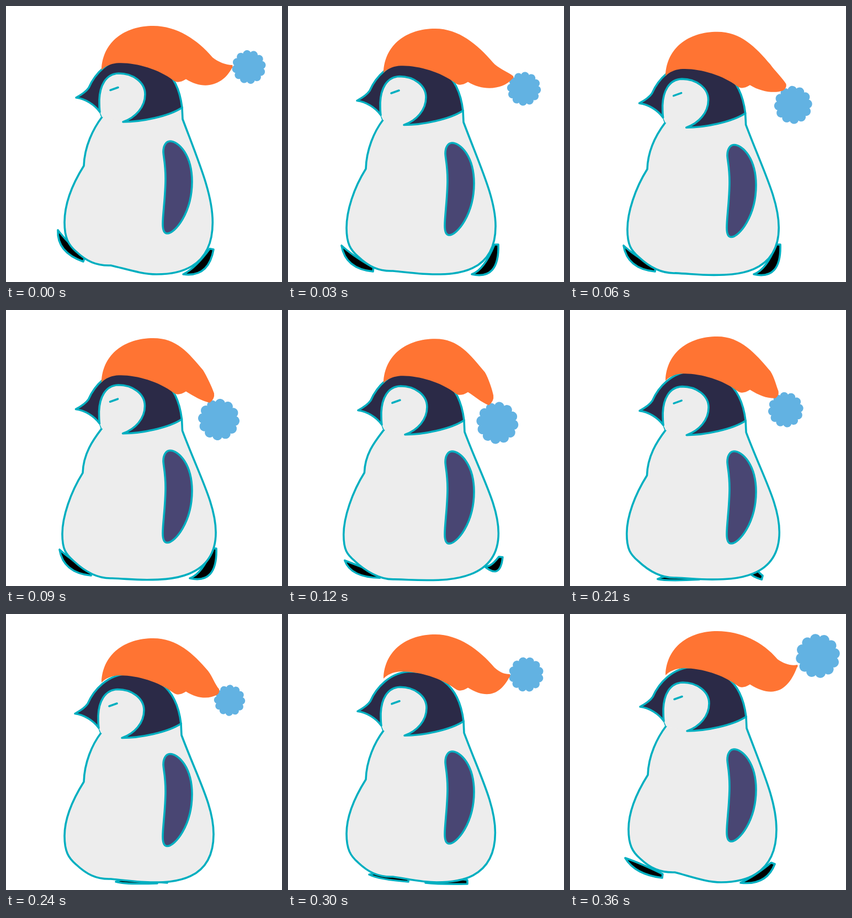
Write an HTML page that moves like this. It is 500 by 500 pixels and loops after 390 ms.

```html
<!DOCTYPE html>
<html lang="en">
<head>
<meta charset="utf-8">
<title>Walking penguin</title>
<style>
  html, body { margin: 0; height: 100%; overflow: hidden; background: #fff; }
  svg { display: block; width: 100vw; height: 100vh; }
  .line { stroke: #00afc0; stroke-width: 3.6; stroke-linejoin: round; stroke-linecap: round; }
  .light { fill: #ededed; }
  .dark { fill: #2b2a47; }
  .wing { fill: #494673; }
  .hat { fill: #ff7433; }
  .pom { fill: #62b2e2; }
  .none { fill: none; }
</style>
</head>
<body>
<svg viewBox="0 0 500 500">
  <path id="footA" class="line"/>
  <path id="footB" class="line"/>
  <path id="body" class="line light"/>
  <g id="head">
    <path id="face" class="light"/>
    <path id="hood" class="line dark"/>
    <path class="line none" d="M189 152.500L203 147.500"/>
  </g>
  <path id="pom" class="pom"/>
  <path id="hat" class="hat"/>
  <path id="wing" class="line wing" d="M297 245C290 245 285 253 285 264C285 272 289 285 289 312C289 345 284 375 284 395C284 406 287 412 292 412C306 412 337 375 337 318C337 270 313 245 297 245Z"/>
</svg>
<script>
const STEP = 30, COUNT = 13, STRIDE = 11;
const $ = id => document.getElementById(id);
const draw = (id, d) => $(id).setAttribute('d', d);
const move = (id, x, y) => $(id).setAttribute('transform', `translate(${x} ${y})`);

// Looping smooth curve through timed poses; each pose is [time, ...values].
function track(period, poses) {
  const n = poses.length;
  const at = i => poses[(i + n) % n];
  const time = i => at(i)[0] + period * Math.floor(i / n);
  return t => {
    let i = n - 1;
    while (time(i) > t) i--;
    const [t0, t1, t2, t3] = [-1, 0, 1, 2].map(k => time(i + k));
    const [a, b, c, d] = [-1, 0, 1, 2].map(k => at(i + k));
    const h = t2 - t1, u = (t - t1) / h, v = 1 - u;
    return b.slice(1).map((p, j) => {
      const q = c[j + 1];
      const m = (q - a[j + 1]) / (t2 - t0) * h;
      const w = (d[j + 1] - p) / (t3 - t1) * h;
      return p * v * v * (1 + 2 * u) + q * u * u * (3 - 2 * u) + m * u * v * v - w * u * u * v;
    });
  };
}

// head x, head y, hat y, wing y, belly drop, belly squash
const torso = track(COUNT, [
  [0, 0, 0, 0, 0, 2, 0],
  [1, -2, 5.5, 5, 3, 12, 0],
  [3, -.5, 13.7, 15, 9.5, 18, .67],
  [6, .2, 17.7, 15, 12.5, 21, 1],
  [8, -2, 14.5, 8, 8.5, 12, 0],
  [10, -1, 10.3, 1, 4, 8, 0],
  [12, 0, 2, -5, 0, 0, 0]
]);

// centre and radius
const pompom = track(COUNT, [
  [0, 440, 110.5, 31],
  [1, 427.5, 150, 31],
  [3, 385.5, 198.5, 38],
  [6, 381, 198, 36.5],
  [8, 405, 156.5, 28.5],
  [10, 431.5, 109.5, 32],
  [12, 449, 76, 40.5]
]);

// bend, tip top, tip bottom, tip angle, sag
const tail = track(COUNT, [
  [0, 374, 93, 410, 107, 409, 113, 0, 44],
  [1, 371, 102, 408, 127, 405, 133, .67, 35],
  [3, 357, 109, 377, 151, 369, 168, 1.25, 17],
  [6, 361, 117, 372, 154, 365, 169, 1.42, 17],
  [8, 366, 103, 386, 136, 383, 146, .85, 27],
  [10, 374, 97, 402, 109, 400, 116, 0, 44],
  [12, 376, 82, 412, 92, 411, 97, -.24, 54]
]);

// toe, sole handle, heel
const foot = track(STRIDE * 2, [
  [0, 94, 406, 92, 446, 140, 463],
  [1, 97, 434, 104, 476, 154, 481],
  [4, 124, 485, 140, 491, 198, 488],
  [6, 199, 485, 215, 490, 274, 488],
  [8, 249, 487, 275, 490, 325, 489],
  [10, 309, 487, 356, 492, 371, 453],
  [11, 321, 486, 367, 492, 376, 441],
  [12, 333, 486, 383, 497, 381, 432],
  [15, 372, 420, 366, 477, 390, 484],
  [17, 222, 474, 250, 484, 292, 487],
  [19, 147, 472, 165, 481, 218, 485],
  [21, 100, 442, 118, 472, 167, 478]
]);
// Feet rest for two steps after touching down.
const phase = k => k < 1 ? k : Math.max(1, k - 2);

const faceEdge = 'C235 202 252 183 252 160C252 138 230 122 204 122C180 123 170 145 169 170C169 180 169 186 170 192';
draw('face', `M212 210${faceEdge}L174 201Z`);
draw('hood', `M127 166C140 159 146 154 150 148C160 125 185 94 225 94C265 96 310 110 319 184C295 200 245 210 212 210${faceEdge}C160 178 143 168 127 166Z`);

function footPath(t) {
  const [tx, ty, sx, sy, bx, by] = foot(t);
  const len = Math.hypot(bx - sx, by - sy);
  const nx = (by - sy) / len, ny = (sx - bx) / len;
  const hx = bx + 7 * nx, hy = by + 7 * ny;
  const ux = sx / 2 + (tx + hx) / 4 + 13 * nx;
  const uy = sy / 2 + (ty + hy) / 4 + 13 * ny;
  return `M${tx} ${ty}Q${sx} ${sy} ${bx} ${by}L${hx} ${hy}Q${ux} ${uy} ${tx} ${ty}Z`;
}

function bodyPath(x, y, drop, s) {
  const kx = 141 - 3 * s, ky = 289.5 + y - 12 * s;
  const ax = 106 - 6 * s, ay = 390 + drop - 3.5 * s;
  const qx = 127 - 7 * s, qy = 443 + .9 * drop - 7 * s;
  const dx = 190 + 3 * s, dy = 468 + drop;
  const mx = 274 - .6 * drop - 12 * s, my = 486 + 4 * s;
  const rx = 374 + .17 * drop + 4.5 * s, ry = 390.5 + .7 * drop;
  return `M${170 + x} ${190 + y}L${174 + x} ${201 + y}` +
    `C${158 + x} ${222 + y} ${kx + 1} ${ky - 35} ${kx} ${ky}` +
    `C${kx - 22} ${ky + 35} ${ax} ${ay - 31} ${ax} ${ay}` +
    `C${ax} ${ay + 28} ${qx - 14} ${qy - 12} ${qx} ${qy}` +
    `C${qx + 18} ${qy + 17} ${dx - 27} ${dy + 1} ${dx} ${dy}` +
    `C${dx + 28} ${dy * .6 + my * .4} ${mx - 27} ${my} ${mx} ${my}` +
    `C${mx + 35} ${my} ${rx} ${ry + 86} ${rx} ${ry}` +
    `C${rx} ${ry - 51} ${350 + x} ${285 + y} ${320 + x} ${205 + y}` +
    `L${319 + x} ${184 + y}`;
}

function hatPath([sx, sy, tx, ty, ex, ey, tilt, sag], y) {
  const bend = .7 + .25 * tilt;
  return `M173 ${115 + y}C175 ${65 + y} 215 ${36 + y} 267 ${36 + y}` +
    `C309 ${36 + y} ${sx - 27} ${sy - 32} ${sx} ${sy}` +
    `C${sx + 13 * Math.cos(bend)} ${sy + 13 * Math.sin(bend)} ${tx - 11 * Math.cos(tilt)} ${ty - 11 * Math.sin(tilt)} ${tx} ${ty}` +
    `Q${tx + 1.5} ${ty + .6 * (ey - ty)} ${ex} ${ey}` +
    `C${ex - 14} ${ey + 1.1 * (sag - 20)} ${326 + .85 * sag} ${132.5 + y + .53 * sag} 326 ${132.5 + y}` +
    `C316 ${139 + y} 308 ${139 + y} 303 ${134.5 + y}` +
    `C275 ${113 + y} 230 ${101 + y} 200 ${103.5 + y}` +
    `C189 ${105 + y} 180 ${109 + y} 173 ${116 + y}Z`;
}

function pomPath([x, y, r], turn) {
  const pts = [];
  for (let i = 0; i < 180; i++) {
    const a = i * Math.PI / 90;
    const s = r * (.86 + .13 * Math.abs(Math.sin(6 * a)) ** .7);
    pts.push(`${(x + s * Math.cos(a + turn)).toFixed(2)} ${(y + s * Math.sin(a + turn)).toFixed(2)}`);
  }
  return `M${pts.join('L')}Z`;
}

function render(k) {
  const [hx, hy, hatY, wingY, drop, squash] = torso(k);
  const tip = tail(k), ball = pompom(k);
  draw('footA', footPath(phase(k)));
  draw('footB', footPath(phase(k) + STRIDE));
  draw('body', bodyPath(hx, hy, drop, squash));
  draw('hat', hatPath(tip, hatY));
  draw('pom', pomPath(ball, Math.atan2(ball[1] - tip[3], ball[0] - tip[2])));
  move('head', hx, hy);
  move('wing', 0, wingY);
}

const start = performance.now();
let last = -1;
function tick() {
  const k = Math.floor((performance.now() - start) / STEP) % COUNT;
  if (k !== last) render(last = k);
  requestAnimationFrame(tick);
}
tick();
</script>
</body>
</html>
```
